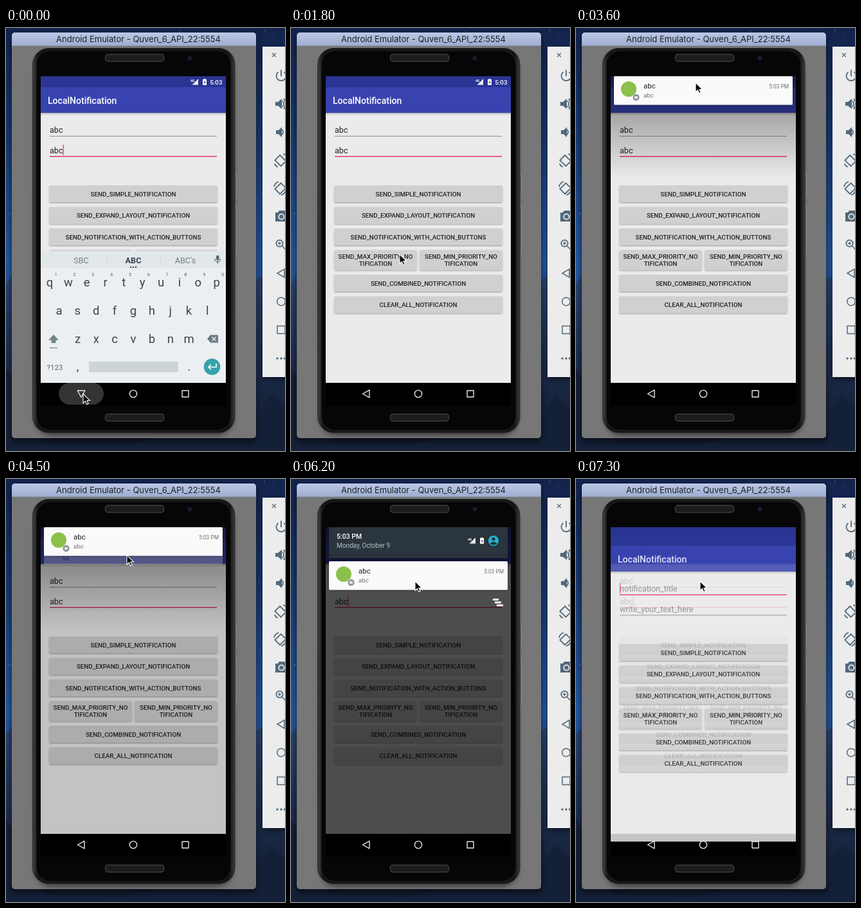
Recreate the animation shown at these times as an HTML page. Size 434 by 658 pixels, loop 7400 ms.

```html
<!DOCTYPE html>
<html lang="en">
<head>
<meta charset="utf-8">
<title>Local notification demo</title>
<style>
  html, body { margin: 0; width: 100%; height: 100%; overflow: hidden; background: #15264f; }
  svg { display: block; width: 434px; height: 658px; }
  text { font-family: Roboto, sans-serif; white-space: pre; }
  .title { font: 13px Inter, sans-serif; fill: #1d2026; }
  .mid { text-anchor: middle; }
  .end { text-anchor: end; }
  .bold { font-weight: 500; }
  .btn { font-size: 9.8px; font-weight: 500; text-anchor: middle; fill: #222; }
  .line { fill: none; stroke: #52687a; stroke-width: 1.8; }
  .solid { fill: #52687a; }
</style>
</head>
<body>
<svg viewBox="0 0 434 658">
  <defs>
    <linearGradient id="sky" x2="0" y2="1">
      <stop offset="0" stop-color="#13234b"/><stop offset=".25" stop-color="#17386f"/>
      <stop offset=".55" stop-color="#2456a0"/><stop offset="1" stop-color="#1c335e"/>
    </linearGradient>
    <linearGradient id="rock" x2="0" y2="1">
      <stop offset="0" stop-color="#28436f"/><stop offset=".5" stop-color="#1c2c4b"/><stop offset="1" stop-color="#111a2d"/>
    </linearGradient>
    <linearGradient id="bar" x2="0" y2="1">
      <stop offset="0" stop-color="#bcc8e6"/><stop offset="1" stop-color="#9daccf"/>
    </linearGradient>
    <linearGradient id="rim">
      <stop offset="0" stop-color="#444"/><stop offset=".025" stop-color="#151515"/>
      <stop offset=".975" stop-color="#151515"/><stop offset="1" stop-color="#3c3c3c"/>
    </linearGradient>
    <linearGradient id="fade" x2="0" y2="1">
      <stop offset="0" stop-opacity=".45"/><stop offset=".35" stop-opacity=".3"/><stop offset="1" stop-opacity="0"/>
    </linearGradient>
    <linearGradient id="under" x2="0" y2="1">
      <stop offset="0" stop-opacity=".22"/><stop offset="1" stop-opacity="0"/>
    </linearGradient>
    <filter id="soft" x="-20%" y="-20%" width="140%" height="140%"><feGaussianBlur stdDeviation="5"/></filter>
    <filter id="drop" x="-10%" y="-20%" width="120%" height="150%">
      <feDropShadow dx="0" dy="1" stdDeviation=".8" flood-opacity=".38"/>
    </filter>
    <clipPath id="screen"><rect x="54" y="75" width="288" height="477"/></clipPath>
    <clipPath id="glass"><rect x="54" y="75" width="288" height="512"/></clipPath>
    <clipPath id="window"><rect x="9" y="7" width="380" height="631" rx="5"/></clipPath>
  </defs>

  <rect width="434" height="658" fill="url(#sky)"/>
  <g id="stars"></g>
  <path fill="url(#rock)" d="M0 398L9 385L60 430L200 520L389 392L398 386L434 440V658H0Z"/>
  <path fill="#142037" d="M0 530L12 548L60 646L180 650L389 604L412 570L434 590V658H0Z"/>

  <rect x="9" y="12" width="380" height="631" rx="5" opacity=".6" filter="url(#soft)"/>
  <g clip-path="url(#window)">
    <rect x="9" y="7" width="380" height="631" fill="#777"/>
    <rect x="9" y="7" width="380" height="21" fill="url(#bar)"/>
    <path d="M9 28H389" stroke="#6f7484" stroke-width=".7"/>
    <rect x="46" y="46" width="306" height="587" rx="24" opacity=".55" filter="url(#soft)"/>
  </g>
  <text class="title mid" x="206" y="22">Android Emulator - Quven_6_API_22:5554</text>

  <g fill="#555" stroke="#aaa" stroke-width=".7">
    <rect x="356" y="228" width="2.5" height="32"/><rect x="356" y="278" width="2.5" height="72"/>
  </g>
  <rect x="41.5" y="31.5" width="314.500" height="598" rx="25" fill="url(#rim)" stroke="#262626"/>
  <rect x="47" y="35" width="303" height="591" rx="22" fill="#060606" stroke="#2a2a2a" stroke-width=".8"/>
  <g fill="#1c1c1c" stroke="#3d3d3d" stroke-width="1.4">
    <rect x="154.500" y="41" width="91" height="11" rx="4"/><rect x="154.500" y="600.500" width="91" height="11" rx="4"/>
  </g>
  <circle cx="286" cy="47" r="4" fill="#11131c"/><circle cx="286" cy="47" r="2" fill="#1f2544"/>
  <rect x="54" y="75" width="288" height="512"/>

  <g clip-path="url(#screen)">
    <g id="old"></g>
    <rect id="scrim" x="54" y="75" width="288" height="160" fill="url(#fade)"/>
    <rect id="dim" x="54" y="75" width="288" height="477"/>
    <g id="shade">
      <g id="header">
        <rect x="59" y="70" width="278" height="53" rx="2" fill="#2b363c" filter="url(#drop)"/>
        <path d="M59 118H337" stroke="#20292e"/>
        <text class="bold" x="71" y="93" font-size="10.500" fill="#fff">5:03 PM</text>
        <text x="71" y="107" font-size="10" fill="#b7c2c7">Monday, October 9</text>
        <g id="headerIcons" transform="translate(-12 12)"></g>
        <circle cx="315" cy="96" r="8" fill="#20b4d2"/>
        <circle cx="315" cy="93.300" r="2.600" fill="#1f343c"/>
        <path d="M309.500 100.500Q315 94.500 320.500 100.500Q315 104.500 309.500 100.500Z" fill="#1f343c"/>
      </g>
      <g id="lower"></g>
      <path id="clear" fill="#fff" d="M314 186h9v3h-9zM317 190.500h10v3h-10zM320 195h10v3h-10z"/>
    </g>
    <g id="headsUp"></g>
    <g id="status"></g>
    <g id="keyboard"></g>
  </g>

  <rect id="ripple" x="82" y="552" width="70" height="34" rx="17" fill="#343434"/>
  <g clip-path="url(#glass)"><g id="new"></g></g>
  <g fill="none" stroke="#e8e8e8" stroke-width="1.4" stroke-linejoin="round">
    <path id="back" d="M-5.500 0L5 -5.800V5.800Z"/>
    <circle cx="198" cy="569" r="5.600"/><rect x="274" y="564" width="10" height="10"/>
  </g>

  <rect x="400" y="34" width="50" height="512" opacity=".6" filter="url(#soft)"/>
  <rect x="399" y="29" width="40" height="514" fill="#ececec"/>
  <g class="line">
    <path d="M414 39l6 6m0-6l-6 6" stroke-width="1.200"/>
    <path d="M423.500 68.500A7.500 7.500 0 1 0 432.500 68.500M428 65V75"/>
    <path d="M430 113Q434 118 430 123M432 110Q438 118 432 126"/>
    <path d="M429 157.500Q433 162 429 166.500"/>
    <rect x="421" y="200" width="11" height="13" transform="rotate(-45 426.500 206)"/>
    <path d="M431 196q4 1 5 5M418 211q1 4 5 5"/>
    <rect x="421" y="243" width="11" height="13" transform="rotate(45 426.500 250)"/>
    <path d="M417 247q1-6 7-8M435 252q-1 6-7 8"/>
    <circle cx="425.500" cy="335" r="5.200"/><path d="M429.500 339L435 345M423 335h5M425.500 332.500v5" stroke-width="1.500"/>
    <path d="M422 381.500L433 375V388Z" stroke-width="1.500"/>
    <circle cx="428" cy="425.500" r="6.300" stroke-width="1.500"/>
    <rect x="422" y="463.500" width="12" height="12" stroke-width="1.500"/>
  </g>
  <g class="solid">
    <path d="M419 115h4l6-5v16l-6-5h-4zM420 159h4l5-5v16l-5-5h-4z"/>
    <path d="M419 287h4l2-3h8l2 3v14h-16z"/>
    <circle cx="422" cy="514" r="1.700"/><circle cx="428" cy="514" r="1.700"/><circle cx="433.500" cy="514" r="1.700"/>
  </g>
  <circle cx="428.500" cy="293.500" r="4.200" fill="#52687a" stroke="#ececec" stroke-width="1.800"/>

  <path id="cursor" d="M0 0V14.500L3.400 11.400L5.700 16.600L8.100 15.500L5.900 10.500H10.500Z" stroke="#fff" stroke-width="1.100"/>
</svg>

<script>
const LOOP = 7400, STEP = 100;
const $ = id => document.getElementById(id);
const label = (x, y, s, attrs = '') => `<text x="${x}" y="${y}" ${attrs}>${s}</text>`;
const box = (x, y, w, h, attrs = '') => `<rect x="${x}" y="${y}" width="${w}" height="${h}" ${attrs}/>`;

function button(x, y, w, h, ...lines) {
  const first = y + h / 2 + 3.5 - (lines.length - 1) * 5.5;
  return box(x, y, w, h, 'rx="1.500" fill="#cfd0d0" filter="url(#drop)"') +
    lines.map((s, i) => label(x + w / 2, first + i * 11, s, 'class="btn"')).join('');
}

function field(y, s, color, focused) {
  return label(68, y, s, `font-size="12.600" fill="${color}"`) +
    box(68, y + (focused ? 4.500 : 4.800), 260, focused ? 1.500 : 1, `fill="${focused ? '#e2356f' : '#8b8b8b'}"`);
}

function activity(texts, color, focus, caretX) {
  const wide = (y, s) => button(67.500, y, 261, 26, s);
  return box(54, 75, 288, 477, 'fill="#ebebeb"') +
    box(54, 75, 288, 17, 'fill="#2a3492"') + box(54, 92, 288, 40, 'fill="#3943b0"') +
    box(54, 132, 288, 4, 'fill="url(#under)"') +
    label(65, 118, 'LocalNotification', 'class="bold appName" font-size="14" fill="#fff"') +
    texts.map((s, i) => field(163 + 31.500 * i, s, color, i === focus)).join('') +
    box(caretX, 150 + 31.500 * focus, 1.200, 16.500, 'class="caret" fill="#e2356f"') +
    wide(245, 'SEND_SIMPLE_NOTIFICATION') + wide(278.500, 'SEND_EXPAND_LAYOUT_NOTIFICATION') +
    wide(312, 'SEND_NOTIFICATION_WITH_ACTION_BUTTONS') +
    button(67.500, 345.500, 128, 31, 'SEND_MAX_PRIORITY_NO', 'TIFICATION') +
    button(200.500, 345.500, 128, 31, 'SEND_MIN_PRIORITY_NO', 'TIFICATION') +
    wide(384, 'SEND_COMBINED_NOTIFICATION') + wide(417.500, 'CLEAR_ALL_NOTIFICATION');
}

function card() {
  return box(59, 75, 278, 44.500, 'rx="1.500" fill="#fafafa" filter="url(#drop)"') +
    '<circle cx="82" cy="95" r="12" fill="#8bc04a"/>' +
    '<circle cx="93.500" cy="108" r="5.500" fill="#8d9499" stroke="#fafafa" stroke-width=".8"/>' +
    box(91, 106, 5, 4, 'rx="1" fill="#e4e6e8"') +
    label(105, 94, 'abc', 'font-size="11.500" fill="#222"') +
    label(105, 107.500, 'abc', 'font-size="9.800" fill="#737373"') +
    label(331, 94, '5:03 PM', 'class="end" font-size="8.400" fill="#737373"');
}

const signalIcons = '<path d="M299 79V88.500H289.500Z" fill="#fff" opacity=".9"/>' +
  label(287, 83.500, '4G', 'font-size="5" font-weight="700" fill="#fff"') +
  '<path d="M306 80h1.500v-1h3v1h1.500v8.800h-6z" fill="#fff"/>' +
  '<path d="M309.500 81.500L307.500 85H309L308.600 87.500L310.800 84H309.300Z" fill="#2a3492"/>';

function keyboard() {
  const row = (keys, x, y) => [...keys].map((k, i) =>
    label(x + 28.850 * i, y, k, 'class="mid" font-size="18.500" fill="#37474f"')).join('');
  const digits = [...'1234567890'].map((d, i) =>
    label(77.500 + 28.850 * i, 386, d, 'class="mid" font-size="7.500" fill="#54656e"')).join('');
  const hint = (x, s, extra) => label(x, 365.500, s, `class="mid" font-size="12.600" ${extra}`);
  return box(54, 347, 288, 205, 'fill="#eceff1"') + box(54, 347, 288, 27, 'fill="#e2e7e9"') +
    box(157, 353, 1, 16, 'fill="#cdd4d7"') + box(240, 353, 1, 16, 'fill="#cdd4d7"') +
    hint(117, 'SBC', 'fill="#6f7f87"') + hint(198, 'ABC', 'fill="#37474f" font-weight="700"') +
    hint(279, "ABC's", 'fill="#6f7f87"') +
    [194, 198, 202].map(x => `<circle cx="${x}" cy="372" r="1.200" fill="#37474f"/>`).join('') +
    box(327, 353.500, 4.400, 8, 'rx="2.200" fill="#54656e"') +
    '<path d="M325 359Q325 363.500 329.200 363.500T333.400 359M329.200 363.500V367" fill="none" stroke="#54656e" stroke-width="1.200"/>' +
    digits + row('qwertyuiop', 68, 402) + row('asdfghjkl', 82.500, 446) + row('zxcvbnm', 111.500, 490) +
    '<path d="M74 477L82 485.500H77.500V490H70.500V485.500H66Z" fill="#75858d"/>' + box(68, 497, 12, 1.200, 'fill="#75858d"') +
    '<path d="M313 483.500L318 477.500H330V489.500H318Z" fill="#6b7b83"/>' +
    '<path d="M320.500 480.500l6 6m0-6l-6 6" stroke="#eceff1" stroke-width="1.400"/>' +
    label(76, 531.500, '?123', 'class="mid" font-size="11.500" fill="#54656e"') +
    row(',', 111.500, 533) + box(129, 519, 139, 16.500, 'rx="1.500" fill="#cdd4d7"') + row('.', 285, 533) +
    '<circle cx="320.500" cy="527" r="12.800" fill="#37a2ac"/>' +
    '<path d="M327 522V527.500H315M319 523.500L315 527.500L319 531.500" fill="none" stroke="#fff" stroke-width="1.700"/>';
}

function stars() {
  let seed = 7, out = '';
  const rnd = () => (seed = seed * 16807 % 2147483647) / 2147483647;
  for (let i = 0; i < 260; i++)
    out += `<circle cx="${rnd() * 434}" cy="${rnd() * 350}" r="${.3 + rnd() * .5}" fill="#c5d5f5" opacity="${rnd() * .8}"/>`;
  return out;
}

$('stars').innerHTML = stars();
$('old').innerHTML = activity(['abc', 'abc'], '#222', 1, 88.500);
$('new').innerHTML = activity(['notification_title', 'write_your_text_here'], '#858585', 0, 68);
$('headsUp').innerHTML = $('lower').innerHTML = card();
$('status').innerHTML = signalIcons + label(336.500, 87.500, '5:03', 'class="end bold" font-size="9.800" fill="#fff"');
$('headerIcons').innerHTML = signalIcons;
$('keyboard').innerHTML = keyboard();
const caret = $('old').querySelector('.caret'), appName = $('old').querySelector('.appName');

// Eased value at t along [time, value] points.
function track(t, ...points) {
  if (t <= points[0][0]) return points[0][1];
  for (let i = 1; i < points.length; i++) {
    const [t0, a] = points[i - 1], [t1, b] = points[i];
    if (t < t1) { const u = (t - t0) / (t1 - t0); return a + (b - a) * u * u * (3 - 2 * u); }
  }
  return points[points.length - 1][1];
}

function place(id, x, y, opacity = 1, extra = '') {
  $(id).setAttribute('transform', `translate(${x} ${y}) ${extra}`);
  $(id).setAttribute('opacity', opacity);
}

function draw(t) {
  place('keyboard', 0, track(t, [200, 0], [500, 207]));
  place('ripple', 0, 0, track(t, [100, 1], [500, 0]));
  place('back', 117, 569, 1, `rotate(${track(t, [200, -90], [400, 0])})`);
  place('cursor',
    track(t, [300, 120], [800, 169], [2700, 169], [3300, 186], [4200, 186], [4900, 191], [5600, 193]),
    track(t, [300, 569], [800, 352], [2700, 352], [3300, 85], [4200, 85], [4900, 170], [5600, 159]));

  place('scrim', 0, 0, track(t, [2200, 0], [2500, 1], [4700, 1], [5000, 0]));
  place('status', 0, 0, track(t, [2300, 1], [2500, 0]));
  place('headsUp', 0,
    track(t, [2200, -46], [2400, -17], [2600, 0], [4700, 0], [4900, -12.500], [5100, -40]),
    track(t, [2200, 0], [2400, .86], [2600, 1], [4700, 1], [4900, .84], [5100, 0]));

  place('shade', 0, track(t, [6700, 0], [7100, -130]));
  place('dim', 0, 0, track(t, [4300, 0], [4900, .67], [6700, .67], [7100, 0]));
  place('header', 0, 0, track(t, [4500, 0], [4800, 1]));
  place('lower', 0, track(t, [4300, 0], [4900, 53]), track(t, [4300, 0], [4900, .87], [5100, 1]));
  place('clear', 0, 0, track(t, [5000, 0], [5300, 1], [6700, 1], [6900, 0]));

  place('new', 0, track(t, [7100, 40], [7300, 12]), track(t, [7100, 0], [7300, .84]));
  caret.setAttribute('opacity', (t + 100) % 1000 <= 500 ? 1 : 0);
  appName.setAttribute('fill', t >= 7200 ? '#1c2470' : '#fff');
}

function tick() {
  draw(Math.floor(performance.now() % LOOP / STEP) * STEP);
  requestAnimationFrame(tick);
}
tick();
</script>
</body>
</html>
```
